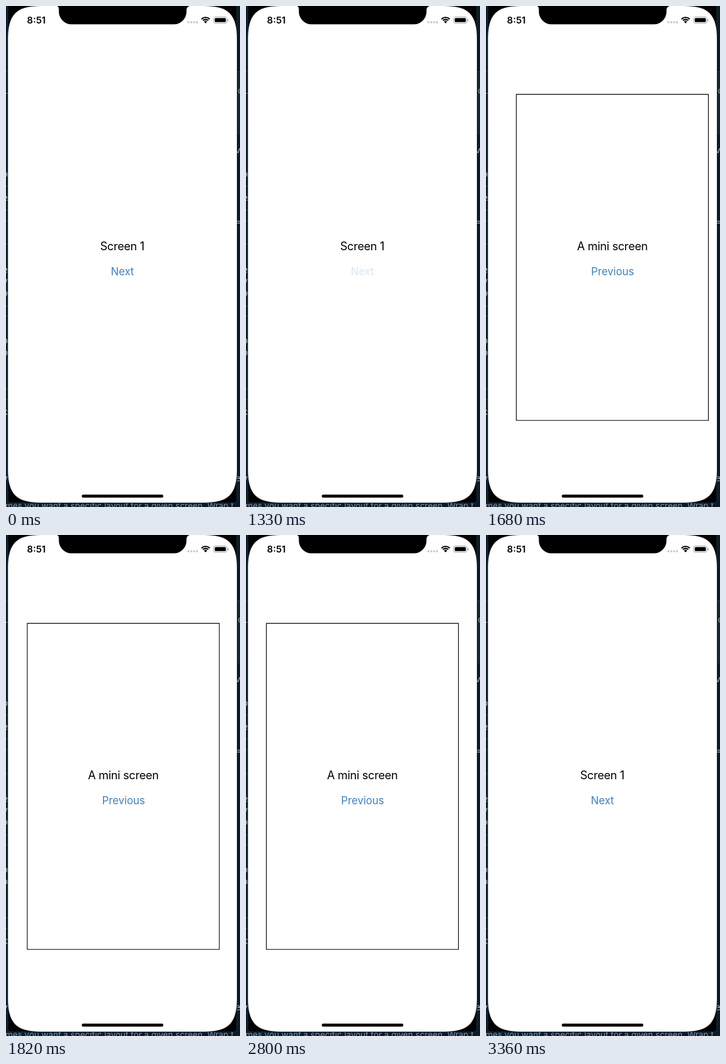
Recreate the animation shown at these times as an HTML page with a canvas. Size 374 by 800 pixels, loop 5.04 s.

```html
<!DOCTYPE html>
<html lang="en">
<head>
<meta charset="utf-8">
<title>Mini screen</title>
<style>
  html, body { margin: 0; width: 100%; height: 100%; overflow: hidden; background: #0b1a28; }
  canvas { display: block; width: 374px; height: 800px; }
</style>
</head>
<body>
<canvas id="stage"></canvas>
<script>
const W = 374, H = 800, LOOP = 5040, STEP = 70;
const SANS = 'Inter, Roboto, sans-serif';
const MONO = '"Noto Sans Mono", "DejaVu Sans Mono", monospace';
const BLUE = '#4182ba';
const stage = document.getElementById('stage');
const c = stage.getContext('2d');
const dpr = window.devicePixelRatio || 1;
stage.width = W * dpr;
stage.height = H * dpr;

// Editor glyphs that peek out beside the phone: character, baseline
const leftBits = [[':', 21], ['.', 78], ['l', 140], ['o', 273], ['-', 292], ['e', 311], ['-', 330],
  ['-', 347], ['-', 385], ['e', 426], ['y', 444], ['o', 463], ['-', 484], ['-', 499], [':', 520],
  ['o', 539], ['o', 558], ['-', 616], ['-', 633], ['k', 653], [':', 672], ['y', 759]];
const rightBits = [['v', 235], ['=', 350], ['e', 759]];

const clamp = v => Math.min(1, Math.max(0, v));
const easeInOut = p => p < 0.5 ? 2 * p * p : 1 - 2 * (1 - p) * (1 - p);

// Remaining distance (1 to 0) of a critically damped spring
function spring(ms, rate) {
  const x = Math.max(0, ms) / 1000 * rate;
  return (1 + x) * Math.exp(-x);
}

function text(str, x, y, font, color, align = 'center', spacing = 0) {
  c.font = font;
  c.fillStyle = color;
  c.textAlign = align;
  c.letterSpacing = spacing + 'px';
  c.fillText(str, x, y);
}

function pill(x, y, w, h, r, color) {
  c.fillStyle = color;
  c.beginPath();
  c.roundRect(x, y, w, h, r);
  c.fill();
}

function label(title, button, x, alpha) {
  text(title, x, 390, '18.2px ' + SANS, '#000', 'center', -0.28);
  c.globalAlpha = alpha;
  text(button, x + 0.3, 429.5, '16.8px ' + SANS, BLUE);
  c.globalAlpha = 1;
}

function drawEditor() {
  c.fillStyle = '#0b1a28';
  c.fillRect(0, 0, W, H);
  c.fillStyle = '#0f2836';
  c.fillRect(369, 105, 5, 100);
  c.fillStyle = '#263644';
  c.fillRect(0, 104, W, 1);
  for (const [ch, y] of leftBits) text(ch, 3, y, '15px ' + MONO, '#a9b4bd', 'right');
  for (const [ch, y] of rightBits) text(ch, 366, y, '15px ' + MONO, '#a9b4bd', 'left');
  text('c', 370, 140, '15px ' + MONO, '#b98a52', 'left');
  text('mes you want a specific layout for a given screen. Wrap t', -1, 802.6, '13.5px ' + SANS, '#8293a1', 'left');
  pill(3, -10, 366, 803.5, 4, '#000');
  c.strokeStyle = '#1d3442';
  c.lineWidth = 1;
  c.stroke();
}

function drawStatus() {
  text('8:51', 48.5, 28, '600 15px ' + SANS, '#000');
  c.fillStyle = '#c8c8cb';
  for (let i = 0; i < 4; i++) {
    c.beginPath();
    c.arc(291.6 + i * 4.6, 26, 1.7, 0, 7);
    c.fill();
  }
  c.strokeStyle = c.fillStyle = '#000';
  c.lineWidth = 2.1;
  for (const r of [9.3, 6]) {
    c.beginPath();
    c.arc(319, 27.6, r, -Math.PI * 0.75, -Math.PI * 0.25);
    c.stroke();
  }
  c.beginPath();
  c.moveTo(319, 27.8);
  c.arc(319, 27.6, 3.6, -Math.PI * 0.75, -Math.PI * 0.25);
  c.fill();
  c.strokeStyle = '#a5a5a8';
  c.lineWidth = 1;
  c.beginPath();
  c.roundRect(331.8, 17.4, 21.4, 10.2, 3);
  c.stroke();
  pill(333.6, 19.2, 17.8, 6.6, 1.6, '#000');
  pill(354.2, 20.8, 1.3, 3.6, 0.6, '#a5a5a8');
}

function drawNotch() {
  const l = 84.5, r = 288.5, bottom = 29.2;
  c.fillStyle = '#000';
  c.beginPath();
  c.moveTo(l - 6, -1);
  c.arcTo(l, 0, l, 7, 6);
  c.arcTo(l, bottom, r, bottom, 20);
  c.arcTo(r, bottom, r, 0, 20);
  c.arcTo(r, 0, r + 6, 0, 6);
  c.lineTo(r + 6, -1);
  c.fill();
}

// Screen outline with smooth, slightly squarish corners
function screenPath() {
  const l = 3.2, t = 0, r = 369, b = 793, e = 52, h = 13.6;
  c.beginPath();
  c.moveTo(l, t + e);
  c.bezierCurveTo(l, t + h, l + h, t, l + e, t);
  c.lineTo(r - e, t);
  c.bezierCurveTo(r - h, t, r, t + h, r, t + e);
  c.lineTo(r, b - e);
  c.bezierCurveTo(r, b - h, r - h, b, r - e, b);
  c.lineTo(l + e, b);
  c.bezierCurveTo(l + h, b, l, b - h, l, b - e);
  c.closePath();
}

function drawPanel(dx, alpha) {
  c.fillStyle = '#fff';
  c.strokeStyle = '#000';
  c.lineWidth = 1.1;
  c.beginPath();
  c.rect(32.5 + dx, 141.1, 307, 520.6);
  c.fill();
  c.stroke();
  label('A mini screen', 'Previous', 186 + dx, alpha);
}

// How far the panel sits to the right of its resting place
function panelShift(t) {
  if (t < 1432 || t >= 3360) return 400;
  if (t >= 1890 && t < 3039) return 0;
  return 366 * (t < 1890 ? spring(t - 1432, 19.8) : 1 - spring(t - 3039, 16));
}

const release = (t, start) => 0.2 + 0.8 * easeInOut(clamp((t - start) / 250));

function nextAlpha(t) {
  return t < 1330 ? 1 : release(t, 1330);
}

function prevAlpha(t) {
  if (t < 2938) return 1 - 0.8 * easeInOut(clamp((t - 2800) / 138));
  return release(t, 2938);
}

function draw(t) {
  c.setTransform(dpr, 0, 0, dpr, 0, 0);
  drawEditor();
  c.save();
  screenPath();
  c.clip();
  c.fillStyle = '#fff';
  c.fillRect(0, 0, W, H);
  label('Screen 1', 'Next', 185.8, nextAlpha(t));
  const dx = panelShift(t);
  if (dx < 366) drawPanel(dx, prevAlpha(t));
  drawStatus();
  drawNotch();
  pill(121, 780.3, 130.5, 4.7, 2.35, '#000');
  c.restore();
}

const begin = performance.now();
function tick() {
  const t = (performance.now() - begin) % LOOP;
  draw(Math.floor(t / STEP) * STEP);
  requestAnimationFrame(tick);
}
tick();
</script>
</body>
</html>
```
